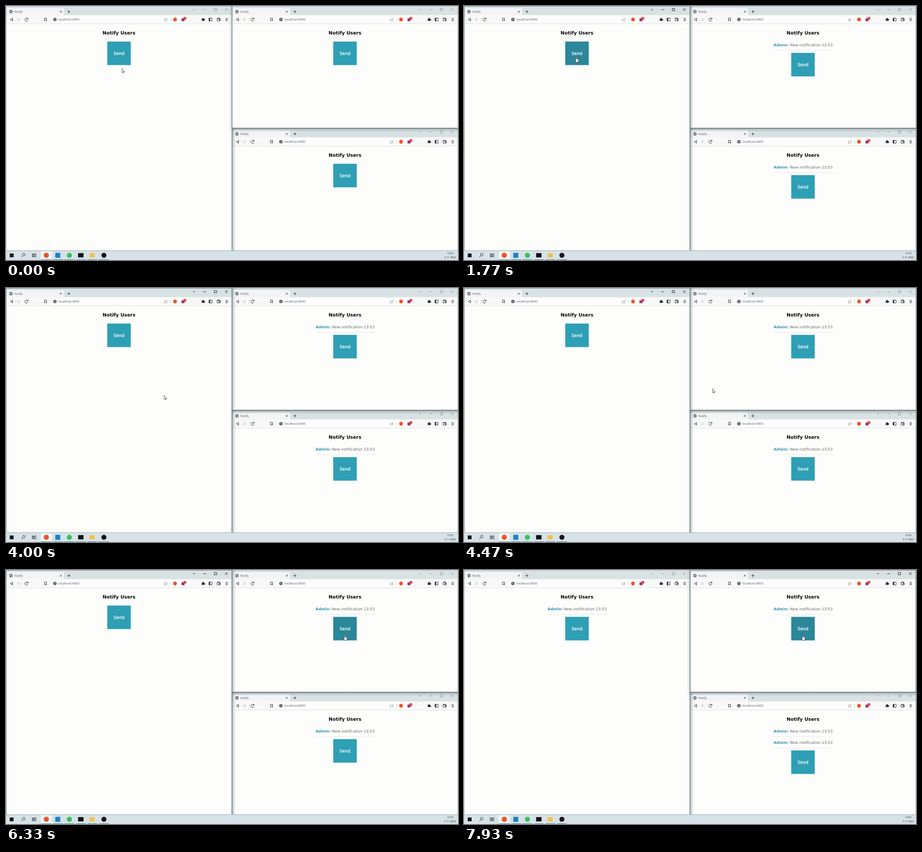
Animation, 998 px wide and 561 px high, one loop 8 s. Source, as an HTML page:

```html
<!DOCTYPE html>
<html lang="en">
<head>
<meta charset="utf-8">
<title>Notify</title>
<style>
html, body { margin: 0; width: 100%; height: 100%; overflow: hidden; background: #fdfdfc; }
svg { display: block; width: 998px; height: 561px; }
text { text-rendering: geometricPrecision; }
.ui { font-family: "Open Sans", "Noto Sans", sans-serif; fill: #50565c; }
.page { font-family: "DejaVu Sans", sans-serif; text-anchor: middle; }
.send { fill: #fff; stroke: #fff; stroke-width: .3; }
.line { fill: none; stroke: #2a2d30; stroke-width: 1; }
</style>
</head>
<body>
<svg id="stage" viewBox="0 0 998 561">
  <defs>
    <linearGradient id="fadeRight">
      <stop offset="0" stop-color="#566" stop-opacity=".4"/>
      <stop offset="1" stop-color="#566" stop-opacity="0"/>
    </linearGradient>
    <linearGradient id="fadeLeft" x1="1" x2="0">
      <stop offset="0" stop-color="#566" stop-opacity=".22"/>
      <stop offset="1" stop-color="#566" stop-opacity="0"/>
    </linearGradient>
    <linearGradient id="fadeDown" x2="0" y2="1">
      <stop offset="0" stop-color="#566" stop-opacity=".4"/>
      <stop offset="1" stop-color="#566" stop-opacity="0"/>
    </linearGradient>
  </defs>
  <g id="windows"></g>
  <rect id="shadeLeft" x="492" width="7" height="275" fill="url(#fadeLeft)"/>
  <rect id="shadeRight" x="499" width="8" height="270" fill="url(#fadeRight)"/>
  <rect x="499" y="270" width="8" height="270" fill="url(#fadeRight)"/>
  <rect x="499" y="270" width="499" height="8" fill="url(#fadeDown)"/>
  <path d="M499 269.7H998" stroke="#6f7b7d" stroke-width="1.4"/>
  <path d="M499 0V540" stroke="#78898c" stroke-width="1.3"/>
  <g id="taskbar"></g>
  <g id="cursor" stroke="#222" stroke-width=".75" fill="#fff" stroke-linejoin="round">
    <path id="arrow" d="M0 0V8.8L2 7.1 3.4 10.2 4.9 9.5 3.5 6.5H6Z"/>
    <path id="hand" d="M-.9 .7C-.9-.5 1-.5 1 .7V3.8L4.4 4.6Q5.4 5 5.1 6.7L4.4 11.2H-.2L-2.7 7.4Q-2.9 5.8-1.7 6.3L-.9 7.2Z"/>
  </g>
</svg>
<script>
const LOOP = 8000, FIRST_CLICK = 1400, SECOND_CLICK = 6700;
const $ = id => document.getElementById(id);

// time, x, y of the pointer tip
const path = [
  [0, 256, 138], [30, 256, 138], [330, 248, 113], [3400, 248, 113],
  [3970, 349, 237], [4040, 349, 237], [4900, 747, 208],
  [5450, 747, 208], [5950, 748, 144], [LOOP, 748, 144]
];

function windowMarkup(x, y, height) {
  return `<g transform="translate(${x} ${y})">
    <rect width="499" height="${height}" fill="#fdfdfc"/>
    <rect width="499" height="20" fill="#d8e1e4"/>
    <path d="M2 20V7Q2 4.5 5 4.5H125Q128 4.5 128 7V20Z" fill="#f3f4f6"/>
    <rect y="20" width="499" height="19" fill="#f7f8f7"/>
    <rect x="100" y="22.5" width="299" height="14.5" rx="3" fill="#fdfdfd"/>
    <path d="M0 39.5H499" stroke="#e0e4e5"/>
    <circle cx="11" cy="12.5" r="3.3" fill="#e8eaec" stroke="#3d4246"/>
    <path d="M8.5 11.5Q10 9.5 11 11T13.5 13M9 14.5Q11 13 11.5 15.5" fill="none" stroke="#3d4246" stroke-width="1.2"/>
    <g class="ui">
      <text x="18.7" y="14.8" font-size="6.6">Notify</text>
      <text x="116" y="32.3" font-size="6.8">localhost:4000</text>
    </g>
    <g class="line">
      <path d="M119 10.5L123 14.5M123 10.5L119 14.5M135.7 12.5H142M138.8 9.3V15.7"/>
      <path d="M14.5 26.8V33L9.7 29.9Z"/>
      <path d="M26.2 26.8V33L31 29.9Z" stroke="#c3c7ca"/>
      <path d="M48 28.1A3.4 3.4 0 1 0 48.4 31M48.6 26V28.7H45.8"/>
      <path d="M85 26.8H89.5V33L87.25 31.2 85 33Z"/>
      <path d="M351.5 28.2H349.5V33H355.5V31M351.5 31Q352 28.2 356 28.2M354.2 26.4L356.2 28.2 354.2 30" stroke="#868c91" stroke-width=".8"/>
      <path d="M363.5 25.5V34" stroke="#d0d5d8"/>
      <path d="M448.2 26.7H455V33H448.2Z"/>
      <path d="M466 28V32.8H473V28ZM466 28L467 26.6H472V28M473 29.6H470.5V31.2H473"/>
      <path d="M484.7 27.4H489.7M484.7 29.9H489.7M484.7 32.4H489.7"/>
    </g>
    <rect x="448.2" y="26.7" width="2.7" height="6.3" fill="#2a2d30"/>
    <path d="M432 28H434A1.3 1.3 0 1 1 436.4 28H437.8V29.3A1.3 1.3 0 1 1 437.8 31.7V33H435.7A1.2 1.2 0 0 0 433.4 33H432V31.5A1.2 1.2 0 0 0 432 29.2Z" fill="#2a2d30"/>
    <circle cx="108" cy="29.8" r="3.7" fill="#555b61"/>
    <path d="M108 27.7V30.4M108 31.2V32" stroke="#fff"/>
    <circle cx="373.2" cy="29.8" r="4.2" fill="#ef5428"/>
    <rect x="387.5" y="27.2" width="6.6" height="6.4" fill="#93387f"/>
    <circle cx="395" cy="27.3" r="3.2" fill="#e23a35"/>
    <text class="ui" x="395" y="29" font-size="4.6" text-anchor="middle" style="fill:#fff">1</text>
    <path class="controls" fill="none" d="M412.3 6.7L414.8 9.2 417.3 6.7M435.5 8.3H441.5M459.8 5.5H465V10.5H459.8ZM483.8 5.2L489.2 10.6M489.2 5.2L483.8 10.6"/>
    <g class="page">
      <text x="249.5" y="62.7" font-size="10.4" font-weight="700" fill="#080808">Notify Users</text>
      ${[0, 25].map(dy => `<g class="note" transform="translate(0 ${dy})">
        <text x="249.8" y="88.8" font-size="8.35" fill="#666"><tspan font-weight="700" fill="#3596a8">Admin:</tspan> New notification 13:53</text>
        <path d="M184 98H315.3" stroke="#e3e6e7"/>
      </g>`).join("")}
      <rect class="button" x="223.5" width="52" height="52"/>
      <text class="send" x="249.5" font-size="9.5">Send</text>
    </g>
    <path class="edge" d="M.5 ${height}V.5H498.5V${height}" fill="none"/>
  </g>`;
}

function taskbarMarkup() {
  const slots = [[77, 24], [104, 22], [129, 22], [155, 21], [180, 21], [205, 22]];
  return `<rect y="540" width="998" height="21" fill="#d6e2e7"/>
    <path d="M0 540.3H998" stroke="#8fa0a5" stroke-width=".9"/>
    <rect x="77" y="541" width="24" height="20" fill="#f0f4f6"/>
    ${slots.map(([x, w]) => `<rect x="${x}" y="560" width="${w}" height="1" fill="#33778a"/>`).join("")}
    <rect x="8.3" y="546.6" width="8.4" height="8.4" fill="#15181a"/>
    <g class="line">
      <circle cx="39.2" cy="549.3" r="2.9"/><path d="M37 551.5L33.8 554.8"/>
      <path d="M58 546.3V548H63.5V546.3M58 555V553.4H63.5V555M58 549.3H63.5V552H58ZM66 546V555.2"/>
    </g>
    <circle cx="89" cy="550.5" r="5.7" fill="#ef5428"/>
    <rect x="108.8" y="545.2" width="11" height="11" fill="#1c82c6"/>
    <circle cx="140" cy="550.6" r="5.6" fill="#33c25a"/>
    <rect x="159.2" y="545.8" width="12" height="9.5" fill="#101214"/>
    <rect x="184.8" y="546" width="11" height="9.3" fill="#f2c14c"/>
    <circle cx="216.2" cy="550.6" r="5.6" fill="#1b1517"/>
    <g class="ui" font-size="5.6" text-anchor="middle" style="fill:#222">
      <text x="980.8" y="548">13:53</text>
      <text x="980.8" y="557">3.11.2022</text>
    </g>`;
}

$("windows").innerHTML = windowMarkup(0, 0, 540) + windowMarkup(499, 0, 270) + windowMarkup(499, 270, 270);
$("taskbar").innerHTML = taskbarMarkup();

const windows = [...$("windows").children].map((node, i) => ({
  x: i ? 499 : 0, y: i === 2 ? 270 : 0,
  notes: node.querySelectorAll(".note"),
  button: node.querySelector(".button"),
  send: node.querySelector(".send"),
  controls: node.querySelector(".controls"),
  edge: node.querySelector(".edge")
}));

const show = (node, on) => node.setAttribute("visibility", on ? "visible" : "hidden");

function pointer(t) {
  const i = path.findIndex(step => step[0] > t);
  const [t0, x0, y0] = path[i - 1], [t1, x1, y1] = path[i];
  const k = (t - t0) / (t1 - t0), e = k * k * (3 - 2 * k);
  return [x0 + (x1 - x0) * e, y0 + (y1 - y0) * e];
}

function draw(t) {
  const [px, py] = pointer(t);
  const first = +(t >= FIRST_CLICK), second = +(t >= SECOND_CLICK);
  const counts = [second, first, first + second];
  const active = second ? 1 : first ? 0 : -1;
  let hovering = false;

  windows.forEach((w, i) => {
    const top = 78.5 + 25 * counts[i];
    const dx = px - w.x - 223.5, dy = py - w.y - top;
    const hover = dx >= 0 && dx <= 52 && dy >= 0 && dy <= 52;
    hovering ||= hover;
    w.notes.forEach((note, n) => show(note, n < counts[i]));
    w.button.setAttribute("y", top);
    w.button.setAttribute("fill", hover ? "#2b8799" : "#2e9fb4");
    w.send.setAttribute("y", top + 29.5);
    w.controls.setAttribute("stroke", i === active ? "#222" : "#92999d");
    w.edge.setAttribute("stroke", i === active ? "#657e84" : "#a3b3b8");
  });

  show($("shadeLeft"), active !== 0);
  show($("shadeRight"), active === 0);
  $("cursor").setAttribute("transform", `translate(${px} ${py})`);
  show($("arrow"), !hovering);
  show($("hand"), hovering);
}

function tick() {
  draw(performance.now() % LOOP);
  requestAnimationFrame(tick);
}
tick();
</script>
</body>
</html>
```
